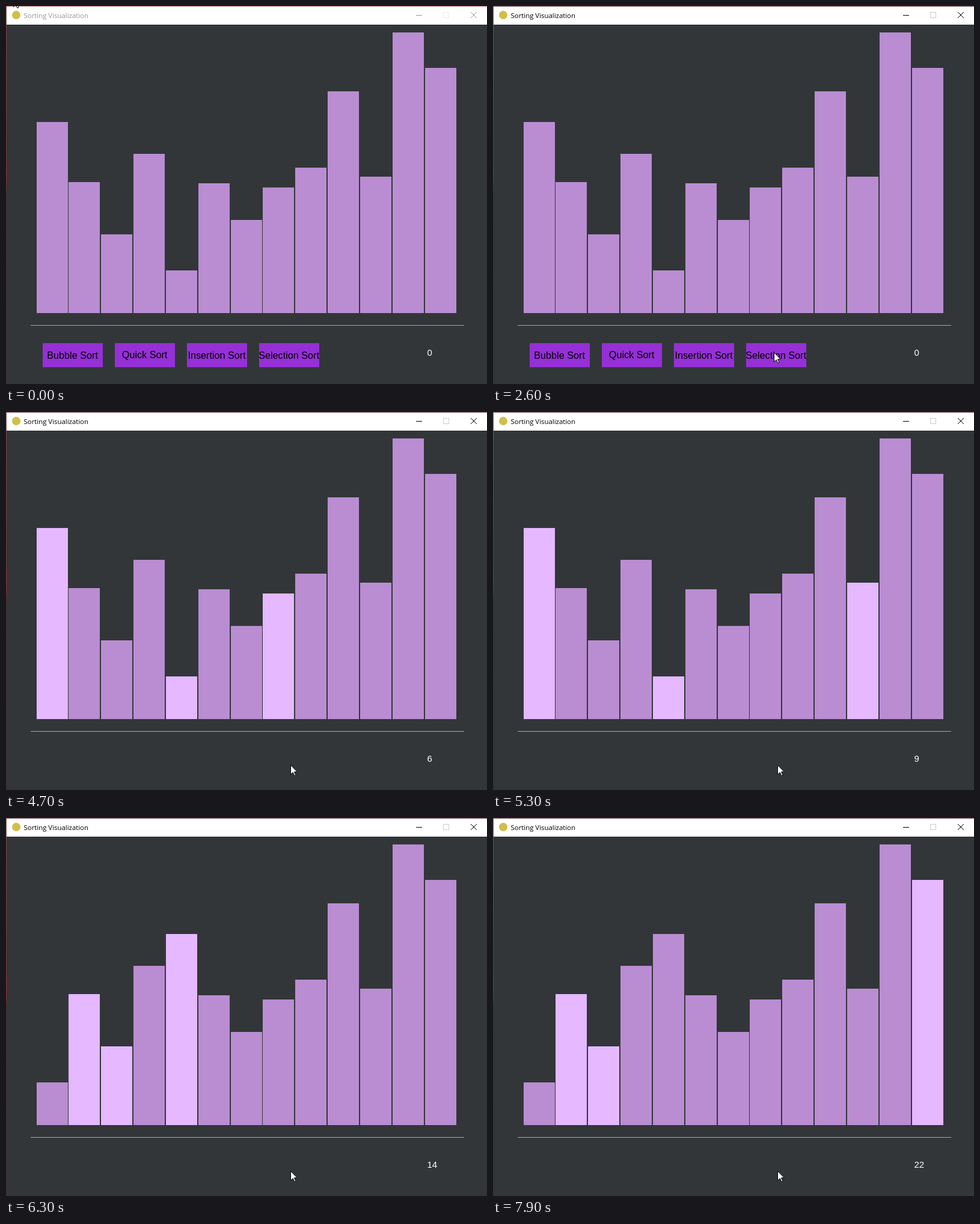
Write an HTML page that moves like this. It is 800 by 629 pixels and loops after 8 s.

```html
<!DOCTYPE html>
<html lang="en">
<head>
<meta charset="utf-8">
<title>Sorting Visualization</title>
<style>
html, body { margin: 0; width: 100%; height: 100%; overflow: hidden; background: #323638; }
svg { display: block; width: 100vw; height: 100vh; }
.title { font: 11.4px "Open Sans", "Noto Sans", sans-serif; }
.label { font: 16.2px "Liberation Sans", Arial, sans-serif; text-anchor: middle; }
.count { font: 15px "Liberation Sans", Arial, sans-serif; fill: #fff; }
</style>
</head>
<body>
<svg id="stage" viewBox="0 0 800 629" xmlns="http://www.w3.org/2000/svg">
  <defs>
    <linearGradient id="edge" x1="0" y1="0" x2="0" y2="1">
      <stop offset="0" stop-color="#8a5055"/>
      <stop offset=".38" stop-color="#6a3438"/>
      <stop offset=".44" stop-color="#a02c30"/>
      <stop offset=".48" stop-color="#7a2a2e"/>
      <stop offset=".5" stop-color="#40292c"/>
      <stop offset="1" stop-color="#3c2c2f"/>
    </linearGradient>
  </defs>
  <rect width="800" height="629" fill="#323638"/>
  <rect y="1" width="800" height="30" fill="#fff"/>
  <rect id="topEdge" width="800" height="1"/>
  <rect width="1" height="629" fill="url(#edge)"/>
  <circle cx="17" cy="15" r="7" fill="#d3bd4b"/>
  <text id="title" class="title" x="29.5" y="20">Sorting Visualization</text>
  <g fill="none" shape-rendering="crispEdges">
    <path id="minimize" d="M682 15.5h10"/>
    <rect id="maximize" x="727.5" y="10.5" width="9" height="9"/>
  </g>
  <path id="close" d="M773 10l10 10M783 10l-10 10" fill="none"/>
  <g id="bars"></g>
  <rect x="41" y="531" width="721" height="1" fill="#a5a8a8"/>
  <g id="buttons"></g>
  <text id="count" class="count" x="700.5" y="582"></text>
  <path id="cursor" d="M.5 .7V16.2L4.2 12.7L6.8 18.4L9 17.4L6.5 11.8H11.4Z"
        fill="#fff" stroke="#000" stroke-width="1"/>
</svg>
<script>
const LOOP = 8000, FOCUS = 2600, PRESS = 2900, START = 3400;
const BASE = 511;
const TOPS = [193, 293, 380, 246, 440, 295, 356, 302, 269, 142, 284, 44, 103];
const COLOR = { bar: '#ba8dd2', active: '#e5b8ff', button: '#9530d6' };
const $ = id => document.getElementById(id);

function add(parent, tag, attrs, text = '') {
  const el = document.createElementNS('http://www.w3.org/2000/svg', tag);
  set(el, attrs);
  el.textContent = text;
  return parent.appendChild(el);
}

function set(el, attrs) {
  for (const key in attrs) el.setAttribute(key, attrs[key]);
}

const bars = TOPS.map((_, i) =>
  add($('bars'), 'rect', { x: Math.floor(51 + i * 700 / 13), width: 52 }));

const buttons = ['Bubble', 'Quick', 'Insertion', 'Selection'].map((name, i) => {
  const x = 61 + i * 120;
  const box = add($('buttons'), 'rect', { x, y: 561, width: 100, height: 40 });
  add($('buttons'), 'text', { class: 'label', x: x + 49.6, y: i === 1 ? 586 : 587 }, name + ' Sort');
  return box;
});

// Every comparison of a selection sort, as it looks while being made
function sortSteps(start) {
  const steps = [], list = start.slice();
  for (let i = 0; i < list.length - 1; i++) {
    let min = i;
    for (let j = i + 1; j < list.length; j++) {
      steps.push({ list: list.slice(), active: [i, j, min] });
      if (list[j] > list[min]) min = j;   // a lower bar has a larger top
    }
    [list[i], list[min]] = [list[min], list[i]];
  }
  return steps;
}
const steps = sortSteps(TOPS);

// The first moves end at 3800, later ones come in runs with a short pause
function stepAt(t) {
  if (t < START) return -1;
  if (t < 4100) return Math.min(2, Math.floor((t - START) / 200));
  return 3 + Math.floor((t - 4100) / 200);
}

const mix = (a, b, u) => a.map((v, i) => v + (b[i] - v) * u);

function cursorAt(t) {
  const tick = Math.floor(t / 100) * 100;
  const corner = [449, 393], rest = [467, 576];
  if (tick < 300) return [12, -15];
  if (tick <= 1300) {
    const u = (tick - 200) / 1100;
    return mix([12, -15], corner, 1 - (1 - u) ** 1.4);
  }
  if (tick < PRESS) {
    const u = Math.min(1, (tick - 1300) / 1000);
    return mix(corner, rest, 1 - (1 - u) ** 1.5);
  }
  return tick < 3000 ? [469, 580] : [473, 587];
}

function render(t) {
  const focused = t >= FOCUS;
  const n = stepAt(t);
  const { list, active } = n < 0 ? { list: TOPS, active: [] } : steps[n];

  bars.forEach((bar, i) => set(bar, {
    y: list[i],
    height: BASE - list[i],
    fill: active.includes(i) ? COLOR.active : COLOR.bar
  }));

  buttons.forEach((box, i) =>
    set(box, { fill: i === 3 && t >= PRESS ? COLOR.bar : COLOR.button }));
  set($('buttons'), { visibility: n < 0 ? 'visible' : 'hidden' });
  $('count').textContent = Math.max(0, n);

  set($('topEdge'), { fill: focused ? '#6b3f43' : '#b0727a' });
  set($('title'), { fill: focused ? '#000' : '#969696' });
  set($('minimize'), { stroke: focused ? '#000' : '#999' });
  set($('maximize'), { stroke: focused ? '#ccc' : '#ebebeb' });
  set($('close'), { stroke: focused ? '#000' : '#999' });

  const [x, y] = cursorAt(t).map(Math.round);
  set($('cursor'), { transform: `translate(${x} ${y})` });
}

const begin = performance.now();
function loop() {
  render((performance.now() - begin) % LOOP);
  requestAnimationFrame(loop);
}
loop();
</script>
</body>
</html>
```
